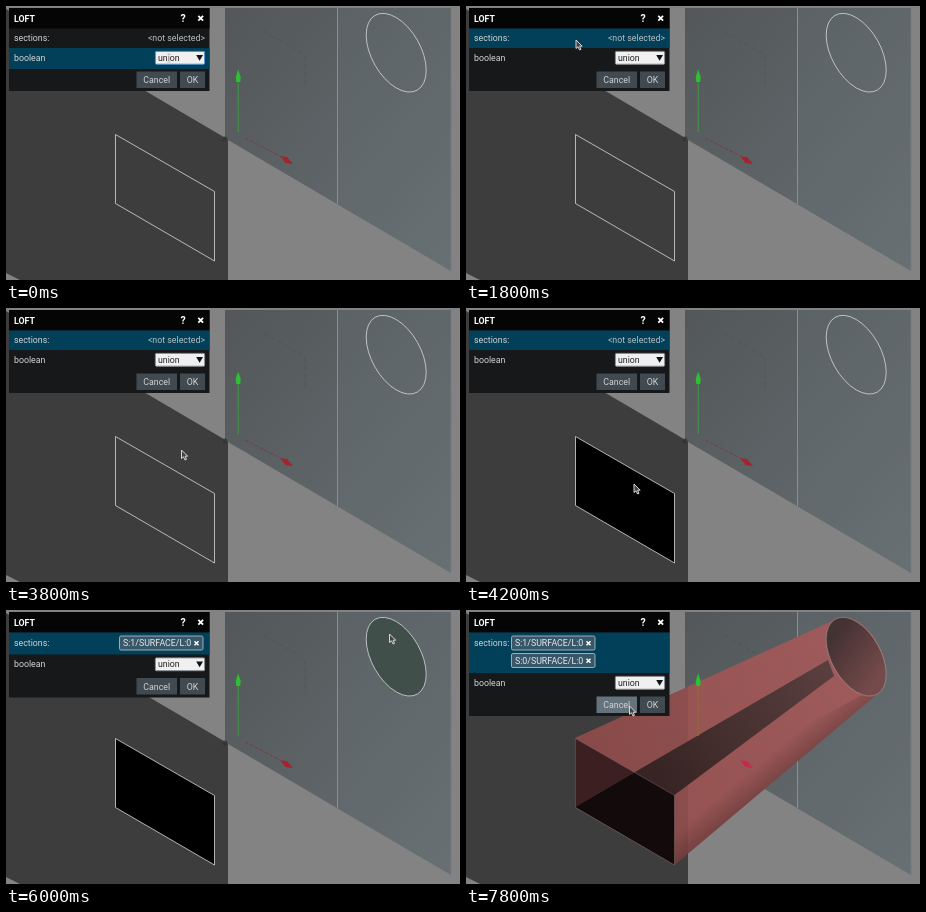
An HTML page that plays this animation: 454x274 px, repeating every 8 s.

```html
<!DOCTYPE html>
<html lang="en">
<head>
<meta charset="utf-8">
<title>Loft</title>
<style>
  html, body { margin: 0; width: 100%; height: 100%; overflow: hidden; background: #838383; }
  svg { display: block; width: 454px; height: 274px; }
  text { font: 8.8px Roboto, Arial, sans-serif; fill: #d4d4d4; white-space: pre; }
  .bold { font-weight: 700; fill: #fff; }
  .edge { fill: none; stroke: #d8d8d8; stroke-width: .8; vector-effect: non-scaling-stroke; }
  .tag rect { fill: #38586a; stroke: #a9bac3; stroke-width: .9; }
  .tag text { fill: #e6eaec; }
</style>
</head>
<body>
<svg viewBox="0 0 454 274">
  <defs>
    <linearGradient id="wall" x1="0" y1="0" x2="1" y2="1">
      <stop offset="0" stop-color="#53575a"/><stop offset="1" stop-color="#676e71"/>
    </linearGradient>
    <linearGradient id="floor" gradientUnits="userSpaceOnUse" x1="195" y1="170" x2="365" y2="58">
      <stop offset="0" stop-color="#382424"/><stop offset="1" stop-color="#5a3f3f"/>
    </linearGradient>
    <linearGradient id="skin" gradientUnits="userSpaceOnUse" x1="109" y1="150" x2="400" y2="40">
      <stop offset="0" stop-color="#92504f"/><stop offset="1" stop-color="#9f5b5b"/>
    </linearGradient>
    <linearGradient id="shade" gradientUnits="userSpaceOnUse" x1="330" y1="122" x2="345" y2="140">
      <stop offset="0" stop-opacity="0"/><stop offset="1" stop-opacity=".2"/>
    </linearGradient>
    <linearGradient id="cap" gradientUnits="userSpaceOnUse" x1="366" y1="30" x2="414" y2="64">
      <stop offset="0" stop-color="#453233"/><stop offset="1" stop-color="#744a4a"/>
    </linearGradient>
    <path id="quad" d="M109.5 128.500 208.500 185.500V255L109.500 197.500Z"/>
    <path id="cross" d="M-2-2 2 2M2-2-2 2" fill="none" stroke="#fff" stroke-width="1.5"/>
    <g id="tag" class="tag">
      <rect x=".5" y=".5" width="83.500" height="14" rx="1.500"/>
      <use href="#cross" transform="translate(77.500 7.700)"/>
    </g>
  </defs>

  <rect width="454" height="274" fill="#838383"/>
  <path d="M0 3 222 133.500V274H14L0 267Z" fill="#3e3d3e"/>
  <path d="M219 2H445V265L222 134 219 132.500Z" fill="url(#wall)"/>
  <path d="M331.5 2H445V265L331.5 198Z" fill="#69777b" opacity=".22"/>
  <path d="M331.5 2V198" stroke="#899092" stroke-width="1"/>
  <path d="M445 3V264" stroke="#777d7f" stroke-width=".8"/>
  <path d="M258 25 299 49V82" fill="none" stroke="#484c4e" stroke-width=".8" stroke-dasharray="5 3" opacity=".5"/>
  <circle cx="219" cy="133" r="2.5" fill="#333" opacity=".8"/>

  <use id="rectFill" href="#quad"/>
  <ellipse id="discFill" rx="1" ry="1" transform="matrix(30 17.6 0 35.2 390.2 46.7)" fill="#414f4b"/>

  <g id="loft">
    <path d="M109 128 364 12Q374 3 391 11C410 22 422 49 420 68Q419 77 415 81L208.5 255 109 197Z" fill="url(#skin)"/>
    <path d="M109 128 222 76.600V243.600L208.500 255 109 197Z" opacity=".07"/>
    <path d="M208.500 185 398 84 415 81 208.500 255Z" fill="url(#shade)"/>
    <path d="M168.500 162.300 362 50 368 66 208.500 185Z" fill="url(#floor)"/>
    <path d="M109 128 168.500 162.300 109 197Z" fill="#3c2021"/>
    <path d="M109 197 168.500 162.300 208.500 185V255Z" fill="#130b0b"/>
    <path d="M360.200 29.100V29.100A1 1 0 0 1 360.200 29.100Z"/>
    <path d="M360.200 29.100C360.200 48.500 373.600 72.200 390.200 81.900S420.200 83.700 420.200 64.300 406.800 21.200 390.200 11.500 360.200 9.700 360.200 29.100Z" fill="url(#cap)"/>
  </g>
  <use href="#quad" class="edge" id="rectEdge"/>
  <circle id="discEdge" r="1" transform="matrix(30 17.6 0 35.2 390.2 46.7)" class="edge"/>

  <path id="greenLine" d="M232.200 76V126" stroke-width="1"/>
  <path d="M232.200 63.500 234.700 71 234.200 76H230.300L229.700 71Z" fill="#2bc232"/>
  <path id="redLine" d="M239 132 276 151" stroke="#783a40" stroke-width=".9" stroke-dasharray="4 1.500"/>
  <path id="redTip" d="M274.500 150.500 281 151 287 158 279.500 157Z"/>

  <g id="panel">
    <rect id="back" x="3" y="2" width="200.500" fill="#171819"/>
    <rect x="3" y="2" width="200.500" height="20.500" fill="#050505"/>
    <text x="8" y="15.500" class="bold">LOFT</text>
    <text x="174.500" y="16" class="bold" style="font-size:10.500px">?</text>
    <use href="#cross" transform="translate(194.700 12.200) scale(1.200)"/>
    <rect id="active" x="3" width="200.500" fill="#023f58"/>
    <text id="sections" x="8">sections:</text>
    <text id="none" x="199" y="35" text-anchor="end" style="fill:#b9c0c3">&lt;not selected&gt;</text>
    <g id="tagA" class="tag">
      <use href="#tag"/><text x="4" y="10.500">S:1/SURFACE/L:0</text>
    </g>
    <g id="tagB" class="tag" transform="translate(45 43)">
      <use href="#tag"/><text x="4" y="10.500">S:0/SURFACE/L:0</text>
    </g>
    <g id="lower">
      <text x="8" y="12.700">boolean</text>
      <rect id="select" x="149.400" y="3.400" width="49.200" height="12.800" rx="1" fill="#f0f0f0"/>
      <text x="152" y="12.800" style="fill:#222">union</text>
      <path d="M190.200 7H197L193.600 12.800Z" fill="#111"/>
      <rect id="cancel" x="130.500" y="23.500" width="40.500" height="16.500"/>
      <text x="150.700" y="35" text-anchor="middle">Cancel</text>
      <rect x="174" y="23.500" width="25" height="16.500" fill="#414a50"/>
      <text x="186.500" y="35" text-anchor="middle">OK</text>
    </g>
  </g>

  <path id="arrow" d="M0 0V8.500L2 6.800 3.500 10 5 9.300 3.600 6.200H6.200Z" fill="#444" stroke="#e6e6e6" stroke-width=".9"/>
  <path id="beam" d="M-2-4H2M0-4V4M-2 4H2" fill="none" stroke="#ccc" stroke-width="1"/>
</svg>
<script>
const LOOP = 8000, STEP = 200;
const el = id => document.getElementById(id);
const set = (id, attrs) => Object.entries(attrs).forEach(([k, v]) => el(id).setAttribute(k, v));
const show = (id, on) => { el(id).style.display = on ? '' : 'none'; };

// Pointer path: time, x, y
const path = [
  [0, 163, 52], [800, 111, 63], [1000, 111, 63], [1800, 110, 34], [2600, 110, 34],
  [3800, 175.5, 142], [4000, 172, 155], [4200, 168, 176], [4600, 168, 174],
  [5200, 130.5, 28], [5600, 338, 32], [6000, 383.5, 24], [7200, 383.5, 24],
  [7600, 202, 90], [7800, 163.5, 96], [8000, 163.5, 96]
];

function pointer(t) {
  const i = path.findIndex(p => p[0] > t);
  const [t0, x0, y0] = path[i - 1], [t1, x1, y1] = path[i];
  const k = (t - t0) / (t1 - t0);
  return [x0 + (x1 - x0) * k, y0 + (y1 - y0) * k];
}

function drawPanel(t, picked) {
  const split = [42, 44.5, 63][picked];
  const onSections = t >= 1400;
  set('back', { height: split + 41 });
  set('active', onSections ? { y: 22.5, height: split - 22.5 } : { y: split, height: 21 });
  set('sections', { y: picked ? 36 : 35 });
  set('tagA', { transform: `translate(${picked === 2 ? 45 : 113} 25.5)` });
  set('lower', { transform: `translate(0 ${split})` });
  set('select', { stroke: onSections ? '#8b9095' : '#4d94cf' });
  set('cancel', { fill: t >= 7800 ? '#65737c' : '#414a50' });
  show('none', picked === 0);
  show('tagA', picked > 0);
  show('tagB', picked === 2);
}

function drawScene(t, lofted) {
  show('rectFill', t >= 4000 && !lofted);
  show('discFill', t >= 5800 && !lofted);
  show('loft', lofted);
  show('redLine', !lofted);
  set('rectEdge', { 'stroke-opacity': lofted ? 0.25 : 1 });
  set('discEdge', { 'stroke-opacity': lofted ? 0.4 : 1 });
  set('greenLine', { stroke: lofted ? '#8b742f' : '#3f9a45', 'stroke-dasharray': lofted ? '2 1' : 'none' });
  set('redTip', { fill: lofted ? '#c52b4d' : '#a8222c' });
}

function render(time) {
  const t = Math.floor((time % LOOP) / STEP) * STEP;
  const lofted = t >= 6600;
  drawScene(t, lofted);
  drawPanel(t, lofted ? 2 : t >= 4600 ? 1 : 0);
  const typing = t < 200 || t === 5200;
  show('beam', typing);
  show('arrow', !typing);
  set(typing ? 'beam' : 'arrow', { transform: `translate(${pointer(t)})` });
}

const start = performance.now();
function tick() {
  render(performance.now() - start);
  requestAnimationFrame(tick);
}
tick();
</script>
</body>
</html>
```
